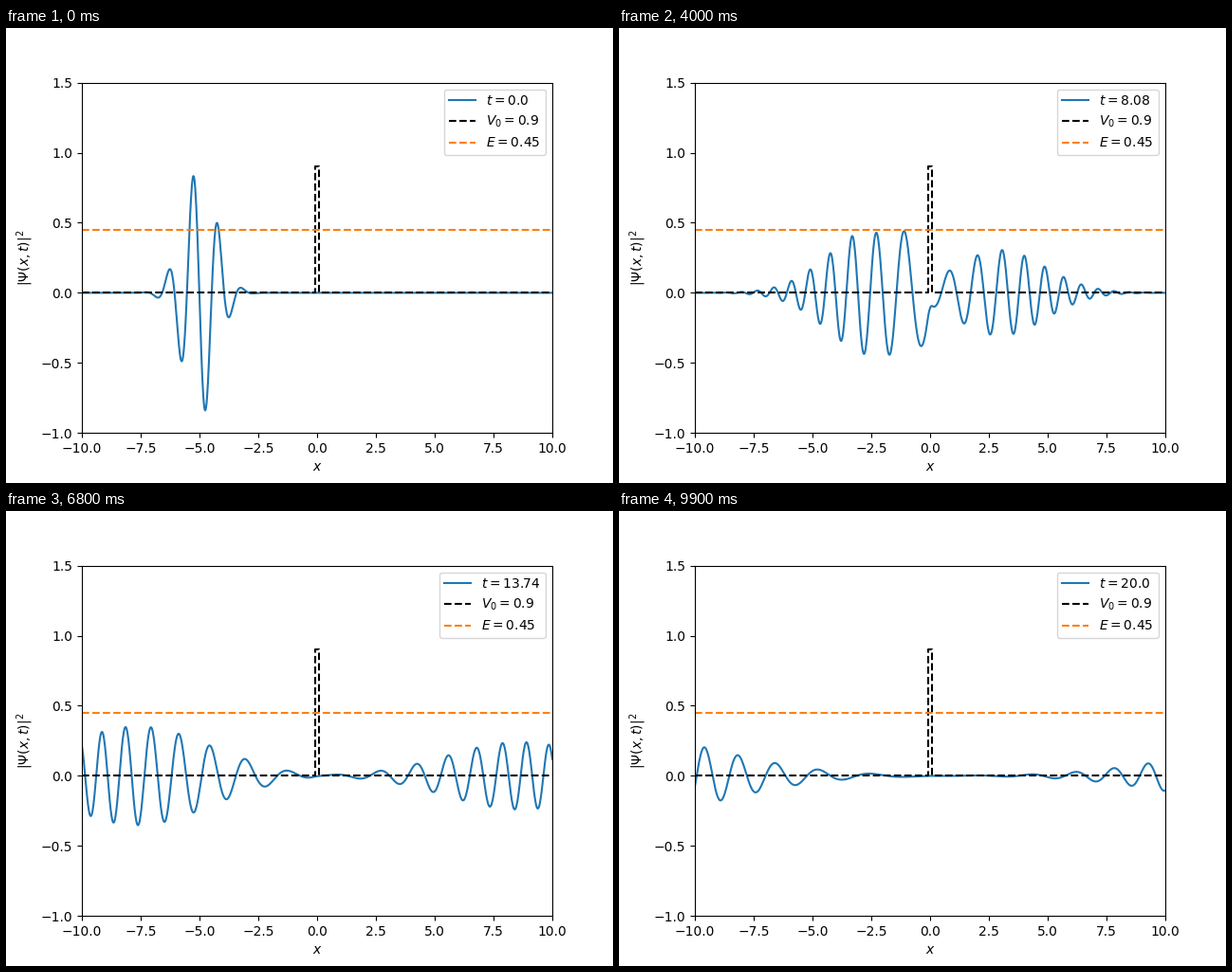
A matplotlib script that plays this animation: 640 by 480 pixels, repeating every 10000 ms.

```python
import numpy as np
import matplotlib.pyplot as plt
from matplotlib.animation import FuncAnimation

FRAMES, INTERVAL = 100, 100
HBAR, MASS = 1 / (2 * np.pi), 1.0
V0, E = 0.9, 0.45
HALF = 0.1                      # half width of the barrier
X0 = -5.0                       # start of the packet
K0 = np.sqrt(2 * MASS * E) / HBAR

times = np.linspace(0, 20, FRAMES)
x = np.linspace(-10, 10, 1001)
k = np.linspace(0.01, 13, 400)
omega = HBAR * k**2 / (2 * MASS)


def scattering_states(x, k):
    """Stationary states of the square barrier for waves from the left."""
    width = 2 * HALF
    kap = np.sqrt(2 * MASS * V0 / HBAR**2 - k**2 + 0j)
    ch, sh = np.cosh(kap * width), np.sinh(kap * width)
    t = np.exp(-1j * k * width) / (ch + 1j * (kap**2 - k**2) / (2 * k * kap) * sh)
    r = -1j * t * (k**2 + kap**2) / (2 * k * kap) * sh
    x = x[:, None]
    wave = np.exp(1j * k * x)
    d = kap * (np.clip(x, -HALF, HALF) - HALF)
    inside = t * np.exp(1j * k * HALF) * (np.cosh(d) + 1j * k / kap * np.sinh(d))
    return np.where(x < -HALF, wave + r / wave,
                    np.where(x > HALF, t * wave, inside))


# Gaussian packet as a sum over wave numbers
weights = ((2 / np.pi) ** 0.25 / (2 * np.sqrt(np.pi)) * (k[1] - k[0])
           * np.exp(-(k - K0) ** 2 / 4 - 1j * (k - K0) * X0))
states = scattering_states(x, k) * weights


def psi(t):
    return (states @ np.exp(-1j * omega * t)).real


fig, ax = plt.subplots(figsize=(6.4, 4.8), dpi=100)
wave_line, = ax.plot(x, psi(0), color="tab:blue")
ax.plot([-10, -HALF, -HALF, HALF, HALF, 10], [0, 0, V0, V0, 0, 0],
        "k--", label=f"$V_0={V0}$")
ax.plot([-10, 10], [E, E], "--", color="tab:orange", label=f"$E={E}$")
ax.set_xlim(-10, 10)
ax.set_ylim(-1, 1.5)
ax.set_xlabel("$x$")
ax.set_ylabel(r"$|\Psi(x,t)|^2$")


def draw(i):
    t = times[i]
    wave_line.set_ydata(psi(t))
    wave_line.set_label(f"$t={round(float(t), 2)}$")
    ax.legend(loc="upper right")
    return wave_line,


anim = FuncAnimation(fig, draw, frames=FRAMES, interval=INTERVAL,
                     init_func=lambda: draw(0), repeat=True, repeat_delay=0)
plt.show()
```
